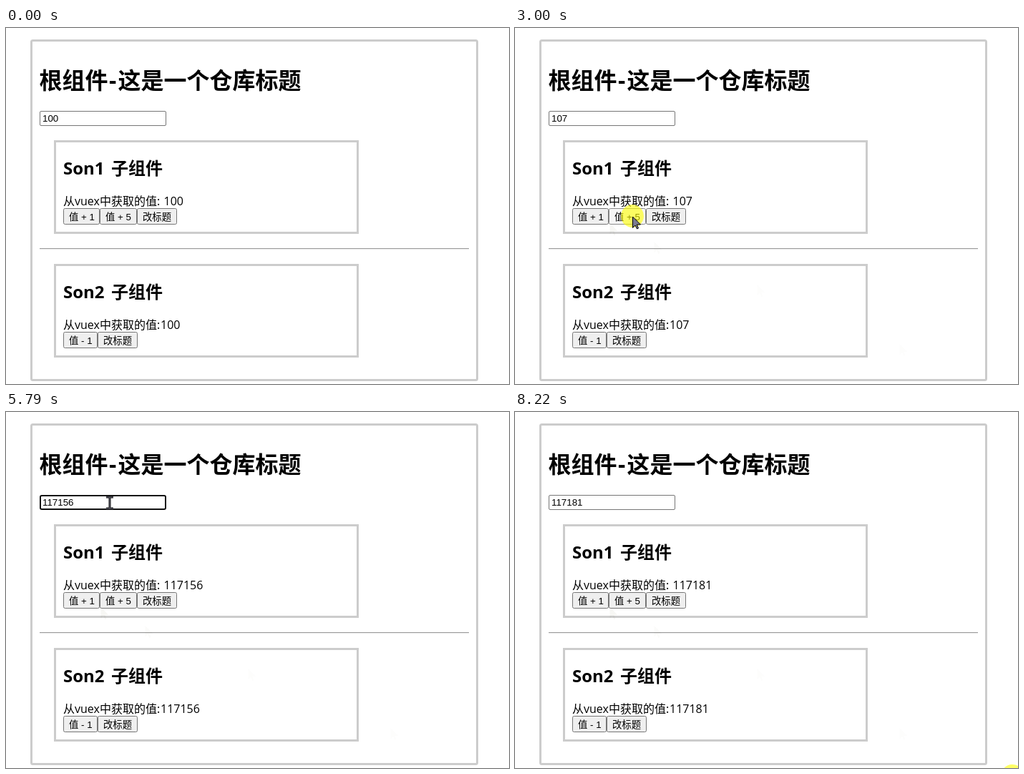
An HTML page for the animation above (8.27 s loop, 703x498 px).

```html
<!DOCTYPE html>
<html lang="zh-CN">
<head>
<meta charset="utf-8">
<style>
  html, body { margin: 0; width: 100%; height: 100%; overflow: hidden; background: #fff; }
  svg { display: block; font: 16px "Open Sans", "Noto Sans CJK SC", "Noto Sans CJK", sans-serif; }
  .h1 { font-size: 32px; font-weight: bold; }
  .h2 { font-size: 24px; font-weight: bold; }
  .control { font: 13.333px "Liberation Sans", "Noto Sans CJK SC", "Noto Sans CJK", sans-serif; }
  .frame { fill: none; stroke: #ccc; stroke-width: 3; }
</style>
</head>
<body>
<svg id="stage" width="703" height="498" viewBox="0 0 703 498"></svg>
<script>
const LOOP = 8270, STEP = 64;
const POINTER = 'M.5 1V16.5L4 13L6.5 18L8.5 17L6.3 12H11.5Z';

// The mouse sweeps in from the lower right, then glides between a few places.
const ENTER = 240, LEAVE = 7840, FROM = [537, 441], HOME = [103, 260];
const GLIDES = [
  { start: 2036, end: 2360, to: [194, 262] },
  { start: 2426, end: 2680, to: [164, 263] },
  { start: 3336, end: 3700, to: [130, 151] },
  { start: 3700, end: 4030, to: [145, 127] },
  { start: 5906, end: 6440, to: [164, 263] },
  { start: 7476, end: LEAVE, to: [695, 509] }
];

const burst = (first, add, { count = 1, period = 0, hold = 70 } = {}) =>
  Array.from({ length: count }, (_, i) => ({ down: first + i * period, up: first + i * period + hold, add }));

const FOCUS = 4090, BLUR = 6620;
const CLICKS = [
  burst(1360, 1, { hold: 180 }),
  burst(1850, 1),
  burst(2770, 5, { count: 3, period: 230 }),
  burst(FOCUS, 0),
  burst(BLUR, 5, { count: 2, period: 180 }),
  burst(7120, 5, { count: 3, period: 140 }),
  burst(8220, 0)
].flat();

const TYPED = '156', TYPE_START = 4790, TYPE_PERIOD = 250;
const typedCount = t => Math.max(0, Math.min(TYPED.length, Math.floor((t - TYPE_START) / TYPE_PERIOD) + 1));

const mix = (a, b, k) => a.map((v, i) => Math.round(v + (b[i] - v) * k));
const stepped = time => Math.floor(time / STEP) * STEP;

function mouseAt(t) {
  if (t < ENTER) return [-99, -99];
  let place = mix(HOME, FROM, Math.exp(-((stepped(t - ENTER) / 92) ** 1.35)));
  for (const { start, end, to } of GLIDES) {
    if (t >= end) place = to;
    else if (t > start) place = mix(place, to, stepped(t - start) / (end - start));
  }
  return place;
}

function valueAt(t) {
  const total = (from, to) => CLICKS.reduce((sum, c) => sum + (c.up > from && c.up <= to ? c.add : 0), 0);
  const typed = TYPED.slice(0, typedCount(t));
  return Number(100 + total(0, Math.min(t, TYPE_START)) + typed) + total(TYPE_START, t);
}

const inside = ([mx, my], x, y, w, h) => mx >= x && mx < x + w && my >= y && my < y + h;
const text = (x, y, content, kind = '') => `<text x="${x}" y="${y}" class="${kind}">${content}</text>`;
const box = (x, y, w, h, attrs) => `<rect x="${x}" y="${y}" width="${w}" height="${h}" ${attrs}/>`;
const pointer = ([x, y], attrs) => `<path d="${POINTER}" transform="translate(${x} ${y})" ${attrs}/>`;

function button(x, y, w, label, mouse, pressed) {
  const hover = inside(mouse, x, y, w, 23);
  const [fill, stroke] = !hover ? ['#efefef', '#767676'] : pressed ? ['#f5f5f5', '#8d8d8d'] : ['#e5e5e5', '#4f4f4f'];
  return box(x + .5, y + .5, w - 1, 22, `rx="2" fill="${fill}" stroke="${stroke}"`) + text(x + 8, y + 17, label, 'control');
}

function son(y, name, valueX, value, buttons) {
  return box(68.5, y + 1.5, 423, 128, 'class="frame"') +
    text(80, y + 48, name, 'h2') + text(147, y + 48, '子组件', 'h2') +
    text(80, y + 91, '从vuex中获取的值:') + text(valueX, y + 91, value) + buttons;
}

function input(t, value) {
  const focused = t >= FOCUS && t < BLUR;
  const typed = typedCount(t);
  const lastEdit = typed ? TYPE_START + (typed - 1) * TYPE_PERIOD : FOCUS;
  const caret = focused && (t - lastEdit) % 1000 < 500;
  const caretX = 51 + Math.floor(String(value).length * 7.415 - .4);
  return (focused
    ? box(48, 117, 175, 19, 'rx="2" fill="#fff" stroke="#101010" stroke-width="2"')
    : box(47.5, 116.5, 176, 20, 'rx="1.5" fill="#fff" stroke="#767676"')) +
    text(51, 131, value, 'control') + (caret ? box(caretX, 119, 1, 15, '') : '');
}

function cursor(mouse) {
  if (!inside(mouse, 47, 116, 177, 21)) return pointer(mouse, 'fill="#7c7c90" stroke="#000"');
  const [x, y] = mouse;
  const beam = `M${x - 5} ${y - 8}h10M${x - 5} ${y + 8}h10M${x} ${y - 8}v16`;
  return `<path d="${beam}" stroke="#111" stroke-width="3"/><path d="${beam}" stroke="#667"/>`;
}

// The sweep leaves a faint trail that grows stronger as the mouse slows down.
function trail(t) {
  return [0, 1, 2, 3].map(i => ENTER + i * STEP).filter(time => t >= time + STEP)
    .map((time, i) => pointer(mouseAt(time), `fill="#662" opacity="${.01 + .0015 * i ** 3}"`)).join('');
}

function render(t) {
  const mouse = mouseAt(t), value = valueAt(t);
  const pressed = CLICKS.some(({ down, up }) => t >= down && t < up);
  return box(35.5, 17.5, 623, 475, 'rx="2" class="frame"') +
    text(46.5, 85, '根组件', 'h1') + text(144, 85, '-', 'h1') + text(156.5, 85, '这是一个仓库标题', 'h1') +
    input(t, value) +
    son(157, 'Son1', 220.5, value,
      button(80, 252, 51, '值 + 1', mouse, pressed) +
      button(131, 252, 52, '值 + 5', mouse, pressed) +
      button(183, 252, 56, '改标题', mouse, pressed)) +
    box(47, 308, 600, 1, 'fill="#9a9a9a"') + box(47, 309, 600, 1, 'fill="#eee"') +
    son(330, 'Son2', 216, value,
      button(80, 425, 48, '值 - 1', mouse, pressed) +
      button(128, 425, 56, '改标题', mouse, pressed)) +
    trail(t) +
    (pressed ? `<circle cx="${mouse[0]}" cy="${mouse[1]}" r="16" fill="#ff0" opacity=".6"/>` : '') +
    (t < LEAVE ? cursor(mouse) : '');
}

const stage = document.getElementById('stage');
let shown = '';
function tick() {
  const picture = render(performance.now() % LOOP);
  if (picture !== shown) stage.innerHTML = shown = picture;
  requestAnimationFrame(tick);
}
tick();
</script>
</body>
</html>
```
